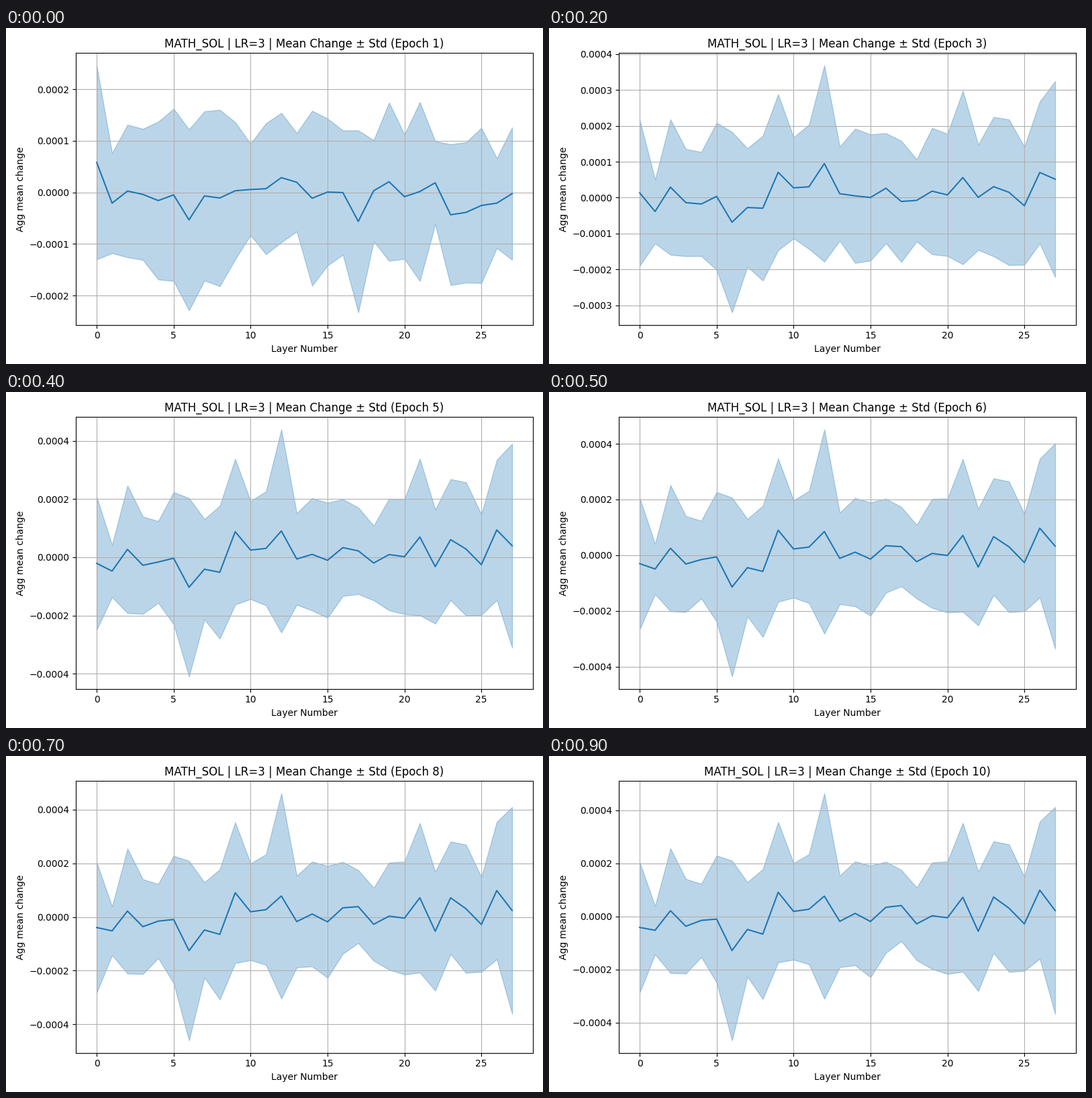
Recreate the animation shown at these times as a matplotlib script. Size 800 by 500 pixels, loop 1 s.

```python
import matplotlib.pyplot as plt
from matplotlib.animation import FuncAnimation
import numpy as np

EPOCHS = 10

# Band edges at the first and last epoch, in millionths, one point per layer.
UPPER_START = [246, 76, 131, 123, 137, 162, 122, 157, 160, 136, 94, 134, 154, 115,
               158, 143, 120, 120, 101, 174, 112, 175, 99, 93, 97, 125, 66, 126]
UPPER_END = [204, 39, 256, 141, 123, 229, 210, 129, 178, 355, 201, 234, 463, 154,
             207, 191, 206, 175, 109, 203, 207, 352, 169, 283, 271, 149, 357, 412]
LOWER_START = [-130, -118, -126, -131, -169, -172, -229, -171, -182, -130, -83, -120, -97, -76,
               -181, -142, -121, -233, -95, -133, -129, -172, -62, -180, -175, -176, -108, -131]
LOWER_END = [-287, -143, -213, -215, -153, -249, -467, -227, -311, -173, -163, -180, -310, -191,
             -184, -229, -137, -93, -165, -198, -217, -208, -281, -137, -209, -205, -159, -368]


def settle(step, rate, power):
    """Ease from 0 at the first step to 1 at the last, levelling off."""
    def rise(x):
        return 1 - np.exp(-rate * x ** power)
    return rise(step) / rise(EPOCHS - 1)


def blend(start, end, amount):
    return (np.array(start) * (1 - amount) + np.array(end) * amount) * 1e-6


fig, ax = plt.subplots(figsize=(8, 5), dpi=100)
layers = np.arange(len(UPPER_START))


def draw(step):
    # The upper edge settles early, the lower edge more slowly.
    upper = blend(UPPER_START, UPPER_END, settle(step, rate=0.55, power=1.1))
    lower = blend(LOWER_START, LOWER_END, settle(step, rate=0.163, power=1.55))
    ax.clear()
    ax.plot(layers, (upper + lower) / 2, color="tab:blue")
    ax.fill_between(layers, lower, upper, color="tab:blue", alpha=0.3)
    ax.set_title(f"MATH_SOL | LR=3 | Mean Change ± Std (Epoch {step + 1})")
    ax.set_xlabel("Layer Number")
    ax.set_ylabel("Agg mean change")
    ax.grid(True)


draw(0)
fig.tight_layout()
animation = FuncAnimation(fig, draw, frames=EPOCHS, interval=100, repeat=True)
plt.show()
```
